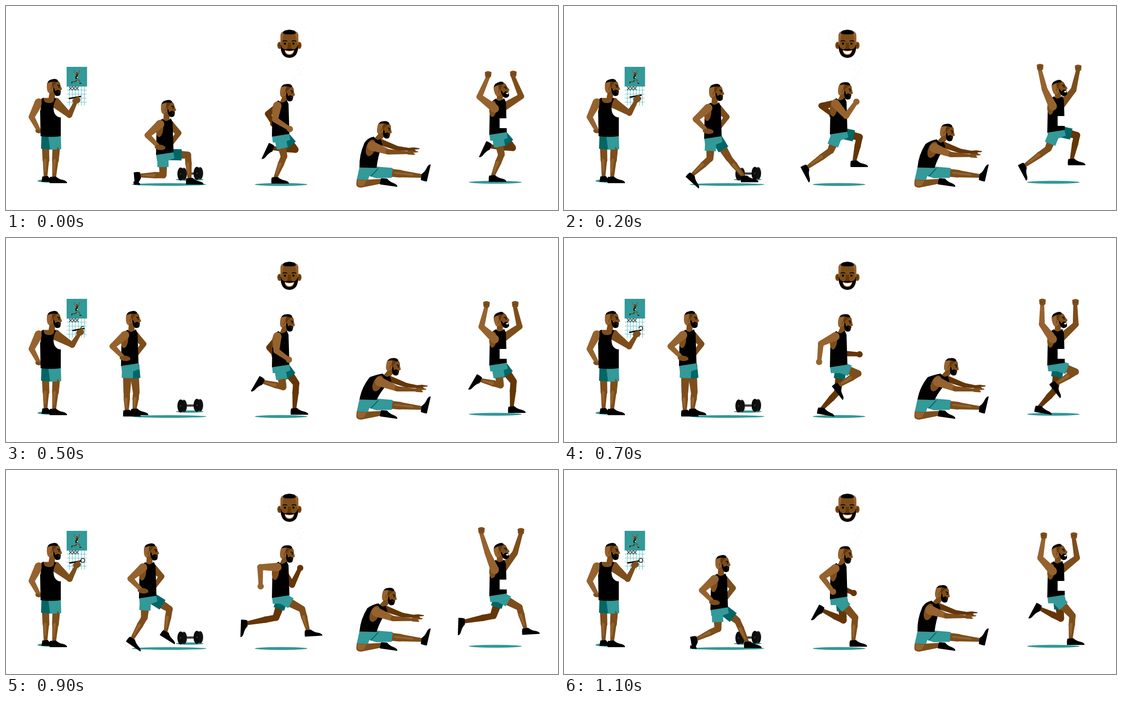
An HTML page with a canvas for the animation above (1200 ms loop, 1229x456 px).

```html
<!DOCTYPE html>
<html lang="en">
<head>
<meta charset="utf-8">
<title>Training routine</title>
<style>
html, body { margin: 0; width: 100%; height: 100%; overflow: hidden; background: #fff; }
canvas { display: block; width: 100vw; height: 100vh; }
</style>
</head>
<body>
<canvas id="stage" width="1229" height="456"></canvas>
<script>
const g = document.getElementById('stage').getContext('2d');
const TEAL = '#339999', DEEP = '#006666', LIGHT = '#96632f', SKIN = '#7d4e1c', DARK = '#653607', INK = '#000';
const KEYS = [0, 2, 4, 5, 7, 9, 11];

// knee x, y, ankle x, y, foot angle
const NEAR_LEG = [
  [619, 336, 599, 386, 0], [594, 323, 540, 362, 62], [604, 335, 546, 328, 111], [617, 333, 570, 321, 120],
  [655, 303, 610, 331, 52], [659, 311, 673, 361, -3], [648, 330, 644, 384, 0]
];
const FAR_LEG = [
  [644, 321, 592, 318, 115], [658, 293, 646, 349, 0], [656, 315, 667, 371, -8], [646, 325, 642, 384, 0],
  [609, 344, 573, 383, 10], [601, 330, 534, 343, 92], [622, 336, 574, 313, 118]
];
// elbow x, y, fist x, y
const NEAR_ARM = [
  [599, 254, 632, 275], [628, 246, 651, 214], [606, 251, 648, 248], [602, 252, 630, 272],
  [572, 236, 568, 277], [566, 217, 567, 260], [575, 239, 599, 272]
];
const FAR_ARM = [
  [583, 241, 595, 263], [573, 223, 597, 243], [577, 222, 590, 258], [586, 245, 598, 262],
  [620, 258, 658, 260], [637, 257, 655, 219], [614, 262, 645, 275]
];
// torso drop, head top, arm raise of the winner
const BODY = [[5, 174, 0], [0, 170, .9], [0, 168, .55], [2, 170, .25], [2, 170, .55], [-1, 168, 1], [2, 170, .35]];
// body shift x, y, then back leg and front leg
const LUNGE = [
  [0, 0, 350, 378, 296, 379, 85, 405, 333, 409, 388, 0],
  [-22, -36, 325, 341, 284, 379, 42, 367, 340, 402, 383, 0],
  [-60, -50, 287, 332, 273, 385, 10, 339, 311, 320, 358, 38],
  [-78, -47, 269, 345, 269, 388, 0, 290, 345, 286, 385, 0],
  [-78, -47, 269, 345, 269, 388, 0, 290, 345, 286, 385, 0],
  [-38, -46, 308, 330, 280, 379, 35, 364, 311, 355, 364, 32],
  [-8, -20, 343, 355, 293, 379, 80, 386, 337, 409, 387, 0]
];
const REACH = [[0], [.55], [1], [1], [1], [.55], [0]];
const WRITE = [[155, 211], [161, 208], [163, 209], [163, 211], [160, 215], [156, 212], [156, 212]];

function pose(table, s, smooth) {
  const n = KEYS.length;
  const time = i => KEYS[(i + n) % n] + 12 * Math.floor(i / n);
  const row = i => table[(i + n) % n];
  let i = n - 1;
  while (KEYS[i] > s) i--;
  const t0 = time(i), d = time(i + 1) - t0, u = (s - t0) / d;
  return row(i).map((a, k) => {
    const b = row(i + 1)[k];
    if (!smooth) return a + (b - a) * u;
    const m0 = (b - row(i - 1)[k]) / (time(i + 1) - time(i - 1)) * d;
    const m1 = (row(i + 2)[k] - a) / (time(i + 2) - t0) * d;
    const u2 = u * u, u3 = u2 * u;
    return a * (2 * u3 - 3 * u2 + 1) + m0 * (u3 - 2 * u2 + u) + b * (3 * u2 - 2 * u3) + m1 * (u3 - u2);
  });
}

function shape(d, color) { g.fillStyle = color; g.fill(new Path2D(d)); }
function line(d, color, w) { g.strokeStyle = color; g.lineWidth = w; g.stroke(new Path2D(d)); }
function oval(x, y, rx, ry, color, rot = 0) {
  g.fillStyle = color;
  g.beginPath();
  g.ellipse(x, y, rx, ry, rot, 0, 7);
  g.fill();
}
function placed(x, y, deg, draw) {
  g.save();
  g.translate(x, y);
  g.rotate(deg * Math.PI / 180);
  draw();
  g.restore();
}

// Tapered bar, round at the ends unless flat
function seg(x1, y1, x2, y2, w1, w2, color, flat) {
  const l = Math.hypot(x2 - x1, y2 - y1) || 1, nx = -(y2 - y1) / l / 2, ny = (x2 - x1) / l / 2;
  shape(`M${x1 + nx * w1},${y1 + ny * w1}L${x2 + nx * w2},${y2 + ny * w2}L${x2 - nx * w2},${y2 - ny * w2}L${x1 - nx * w1},${y1 - ny * w1}z`, color);
  oval(x1, y1, w1 / 2, w1 / 2, color);
  if (!flat) oval(x2, y2, w2 / 2, w2 / 2, color);
}

function shoe(x, y, deg, bend) {
  placed(x, y, deg, () => {
    if (bend) shape('M-7,-3L6,-4L17,3L20,11L-8,11Q-9,2 -7,-3z', INK);
    else shape('M-7,-3L6,-4Q12,2 22,4Q31,6 31,11L-8,11Q-9,2 -7,-3z', INK);
  });
  if (bend) shape(`M${x - 12},${y + 13}L${x - 2},${y + 15}Q${x + 4},${y + 17} ${x + 2},${y + 21}L${x - 12},${y + 20}z`, INK);
}

function leg(hx, hy, [kx, ky, ax, ay, deg], color, cloth, shine, bend) {
  seg(hx, hy, kx, ky, 22, 15, color);
  const mx = kx + (ax - kx) * .35, my = ky + (ay - ky) * .35;
  seg(kx, ky, mx, my, 14, 14, color);
  seg(mx, my, ax, ay, 14, 8, color);
  if (shine) seg(mx - 2, my, kx + (ax - kx) * .8 - 1, ky + (ay - ky) * .8, 7, 3, LIGHT);
  shoe(ax, ay, deg, bend);
  const l = Math.hypot(kx - hx, ky - hy) || 1, r = 29 / l;
  seg(hx, hy, hx + (kx - hx) * r, hy + (ky - hy) * r, 25, 25, cloth, true);
}

function arm(sx, sy, [ex, ey, fx, fy], color, w = 19, fist = 7) {
  seg(sx, sy, ex, ey, w, 13, color);
  seg(ex, ey, fx, fy, 13, 9, color);
  if (fist) oval(fx, fy, fist, fist, color);
}

function head(x, y, deg, bx, by, happy) {
  seg(bx, by, x + 14, y + 28, 14, 13, SKIN);
  placed(x + 17, y + 20, deg, () => {
    g.translate(-17, -20);
    shape('M2,8Q14,2 27,5Q31,9 31,14L35,23L32,25L31,34Q25,40 18,35L12,33Q4,33 2,26Q0,16 2,8z', SKIN);
    shape('M2,8L14,6L15,20L9,31Q3,30 2,25Q0,16 2,8z', LIGHT);
    shape('M13,7L22,6L20,11L17,14L15,24L12,16z', DARK);
    shape('M3,9Q3,3 12,1Q22,-2 26,4L24,7Q14,4 3,9z', INK);
    shape('M15,21L17,20L20,27L25,24L32,27L31,35Q28,39 22,38Q16,35 15,21z', INK);
    oval(11, 22, 4, 6, LIGHT, -.2);
    line('M12,18Q9,20 11,25', DARK, 1.2);
    line('M24,14L30,15', INK, 1.8);
    oval(28, 18, 1.3, 1.5, INK);
    if (happy) shape('M25,28L32,27L30,31Q27,32 25,28z', '#fff');
    else line('M26,29L31,29', DARK, 1.3);
  });
}

function tank() {
  shape('M607,206Q614,216 625,205L629,214L631,281L592,287L593,236Q591,213 607,206z', INK);
  oval(600, 229, 8, 18, SKIN, .1);
}

function waist() {
  shape('M592,282L630,278L633,294L617,300L594,300z', TEAL);
}

function fists(x, y, color) {
  shape(`M${x - 7},${y - 6}Q${x},${y - 11} ${x + 8},${y - 6}L${x + 7},${y + 4}Q${x},${y + 10} ${x - 6},${y + 4}z`, color);
  line(`M${x - 5},${y - 1}L${x + 5},${y - 1}`, DARK, 1);
}

function runner(s, winner) {
  const [drop, top, u] = pose(BODY, s, true);
  const near = pose(NEAR_LEG, s, true), far = pose(FAR_LEG, s, true);
  g.save();
  if (winner) g.translate(484, -4);
  if (winner) arm(622, 226 + drop, [663 - 14 * u, 206 - 16 * u, 645 + 17 * u, 162 - 15 * u], SKIN, 18, 0);
  else arm(610, 217 + drop, pose(FAR_ARM, s, true), DARK, 17, 7);
  leg(617, 284 + drop, far, DARK, DEEP);
  leg(609, 285 + drop, near, SKIN, TEAL, true);
  g.translate(0, drop);
  waist();
  g.translate(0, -drop);
  if (winner) head(602, top - 1, -13, 615, 214 + drop, true);
  else head(609, top, 9, 616, 213 + drop);
  g.translate(0, drop);
  tank();
  if (winner) {
    g.fillStyle = '#fff';
    g.fillRect(615, 250, 17, 22);
  }
  g.translate(0, -drop);
  if (winner) {
    arm(604, 228 + drop, [570 + 18 * u, 207 - 18 * u, 589 - 15 * u, 163 - 18 * u], LIGHT, 19, 0);
    fists(589 - 15 * u, 158 - 18 * u, SKIN);
    fists(645 + 17 * u, 157 - 15 * u, SKIN);
  } else arm(604, 218 + drop, pose(NEAR_ARM, s, true), LIGHT);
  g.restore();
}

function calendar(s) {
  g.fillStyle = TEAL;
  g.fillRect(135, 136, 45.5, 44);
  for (let i = 0; i < 6; i++) line(`M${141 + i * 6.7},180V223`, '#69c2c2', 1.2);
  for (let i = 0; i < 4; i++) line(`M135,${188 + i * 9}H180`, '#69c2c2', 1.2);
  for (let i = 0; i < 3; i++) line(`M${141 + i * 7},180l6,8m0,-8l-6,8`, INK, 1.2);
  g.save();
  g.translate(20.1, 127.7);
  g.scale(.125, .125);
  runner(9, true);
  g.restore();
  if (s > 4) {
    const part = Math.min(1, (s - 3) / 6);
    g.strokeStyle = INK;
    g.lineWidth = 1.4;
    g.beginPath();
    g.arc(171, 202, 4.5, Math.PI, Math.PI * (1 + 2 * part));
    g.stroke();
  }
}

function planner(s) {
  oval(101, 391, 31, 4, TEAL);
  calendar(s);
  const [x, y] = pose(WRITE, s);
  const ex = 141 + .8 * (x - 155), ey = 244 - .6 * (x - 155) + .4 * (y - 211);
  seg(88, 315, 89, 345, 16, 15, SKIN);
  seg(89, 343, 88, 383, 14, 8, SKIN);
  seg(112, 315, 110, 345, 17, 15, SKIN);
  seg(110, 343, 107, 386, 14, 8, SKIN);
  seg(87, 345, 87, 370, 6, 3, LIGHT);
  seg(108, 345, 106, 372, 6, 3, LIGHT);
  shape('M81,381L93,380L98,386L98,393L79,393z', INK);
  shoe(105, 385, 0);
  shape('M79,288L97,288L99,321L78,319z', DEEP);
  shape('M94,288L122,288L123,320L118,320L115,314L113,321L98,321z', TEAL);
  head(90, 163, 0, 101, 210);
  seg(84, 212, 113, 212, 13, 13, SKIN);
  arm(73, 216, [57, 248, 74, 280], LIGHT, 19, 0);
  oval(71, 280, 6, 4, SKIN, .4);
  seg(112, 218, ex, ey, 22, 12, SKIN);
  seg(ex, ey, x, y + 4, 13, 8, SKIN);
  shape('M79,207L84,205Q83,217 96,217Q109,217 107,205L112,207Q102,224 108,240Q113,249 122,249L122,291Q100,294 77,291L76,235Q80,220 79,207z', INK);
  line(`M${x - 15},${y - 4}L${x + 12},${y - 9}`, INK, 3);
  oval(x + 2, y, 9, 7, SKIN, -.3);
  seg(x - 2, y - 2, x + 6, y - 7, 5, 4, SKIN);
}

function dumbbell() {
  oval(409, 388, 31, 2.6, TEAL);
  g.fillStyle = '#444';
  g.fillRect(400, 372, 22, 5);
  for (const [x, y] of [[392, 375.5], [428, 374]]) {
    oval(x + 4, y, 7, 14, '#333');
    oval(x - 3, y, 7.5, 14.5, '#0c0c0c');
    oval(x + 5, y, 5, 12, '#111');
    oval(x - 3, y, 1.5, 2.5, '#333');
  }
}

function lunger(s) {
  oval(363, 399, 83, 3, TEAL);
  dumbbell();
  const [ox, oy, ...joints] = pose(LUNGE, s);
  const back = joints.slice(0, 5), front = joints.slice(5);
  arm(365 + ox, 264 + oy, [384 + ox, 284 + oy, 370 + ox, 305 + oy], SKIN, 17, 4);
  leg(362 + ox, 332 + oy, front, SKIN, DEEP, true);
  leg(349 + ox, 331 + oy, back, SKIN, TEAL, true, back[4] > 60);
  g.save();
  g.translate(ox - 258, oy + 46);
  waist();
  head(602, 164, 0, 615, 212);
  tank();
  arm(601, 218, [573, 243, 598, 269], LIGHT, 19, 0);
  oval(601, 270, 12, 6, SKIN, .1);
  g.restore();
}

function thought() {
  g.setLineDash([2, 8]);
  for (let i = 0; i < 9; i++) {
    const a = i * Math.PI * 2 / 9 + .2;
    g.strokeStyle = '#c4e8e8';
    g.lineWidth = .8;
    g.beginPath();
    g.arc(636 + 36 * Math.cos(a), 82 + 33 * Math.sin(a), 15, a - 1, a + 1);
    g.stroke();
  }
  for (const [x, y, r] of [[655, 138, 8], [653, 153, 4], [641, 161, 4]]) {
    g.beginPath();
    g.arc(x, y, r, 0, 7);
    g.stroke();
  }
  g.setLineDash([]);
  oval(609, 88, 5, 8, SKIN);
  oval(653, 88, 5, 8, SKIN);
  oval(609, 88, 2.5, 5, DARK);
  oval(653, 88, 2.5, 5, DARK);
  shape('M611,66Q612,57 620,56H642Q650,57 651,66V92Q649,112 631,115Q613,112 611,92z', SKIN);
  shape('M611,66Q612,58 619,57L617,68L613,86H611zM651,66Q650,58 643,57L645,68L649,86H651z', LIGHT);
  shape('M617,62Q617,54 625,54Q631,52 637,54Q645,54 645,62Q631,65 617,62z', INK);
  shape('M612,86Q614,96 622,97Q631,93 640,97Q648,96 650,86Q652,115 631,116Q610,115 612,86z', INK);
  shape('M620,98Q631,101 642,98Q641,110 631,110Q621,110 620,98z', SKIN);
  shape('M621,99Q631,103 641,99Q639,108 631,108Q623,108 621,99z', '#fff');
  shape('M628,82L627,91Q625,95 629,96H633Q637,95 635,91L634,82z', DARK);
  oval(621, 84, 2.4, 2.6, INK);
  oval(640, 84, 2.4, 2.6, INK);
  line('M616,79Q621,76 626,79M636,79Q641,76 646,79', INK, 2);
}

function hand(x, y, color) {
  shape(`M${x - 14},${y - 4}L${x - 3},${y - 5}L${x + 10},${y - 3}L${x + 9},${y - 1}L${x - 1},${y}L${x + 3},${y + 4}L${x},${y + 5}L${x - 14},${y + 4}z`, color);
}

function stretcher(s) {
  const [p] = pose(REACH, s);
  const x = 20 * p, y = 11 * p;
  seg(834 + x, 304 + y, 871 + x, 318 + y, 14, 10, DARK);
  seg(871 + x, 318 + y, 902 + 18 * p, 321 + 12 * p, 10, 6, DARK);
  hand(911 + 18 * p, 321 + 12 * p, DARK);
  seg(850, 372, 878, 375, 18, 17, SKIN);
  seg(878, 375, 927, 380, 16, 8, SKIN);
  seg(866, 373, 905, 377, 4, 4, LIGHT);
  shoe(928, 382, -77);
  shape('M781,386L807,388L842,386L846,395L791,406Q780,406 780,398z', SKIN);
  shape('M783,389L803,390L797,401L788,403Q781,402 783,389z', LIGHT);
  shoe(842, 389, 8, false);
  shape('M787,360L826,359L861,362L859,384L824,385L809,380L806,389L781,388z', TEAL);
  line('M829,363L812,381', DEEP, 2);
  head(825 + x, 257 + y, 11, 825 + x, 301 + y);
  shape(`M787,361Q${786 + 6 * p},${333} ${798 + 12 * p},${306 + 5 * p}Q${806 + x},${294 + y} ${819 + x},${292 + y}Q${826 + x},${303 + y} ${834 + x},${297 + y}L${838 + x},${309 + y}Q${828 + 10 * p},335 825,362z`, INK);
  oval(812 + 16 * p, 317 + 8 * p, 10, 19, SKIN, .3 + .15 * p);
  seg(815 + 17 * p, 313 + 8 * p, 851 + x, 326 + y, 21, 12, LIGHT);
  seg(851 + x, 326 + y, 896 + 18 * p, 328 + 12 * p, 12, 6, SKIN);
  hand(908 + 18 * p, 328 + 12 * p, SKIN);
}

function draw(s) {
  g.fillStyle = '#fff';
  g.fillRect(0, 0, 1229, 456);
  planner(s);
  lunger(s);
  thought();
  oval(612.5, 399, 58.5, 3.2, TEAL);
  runner(s, false);
  stretcher(s);
  oval(1089.5, 394, 58.5, 3.2, TEAL);
  runner(s, true);
}

const start = performance.now();
function tick() {
  draw(Math.floor((performance.now() - start) / 100) % 12);
  requestAnimationFrame(tick);
}
tick();
</script>
</body>
</html>
```
